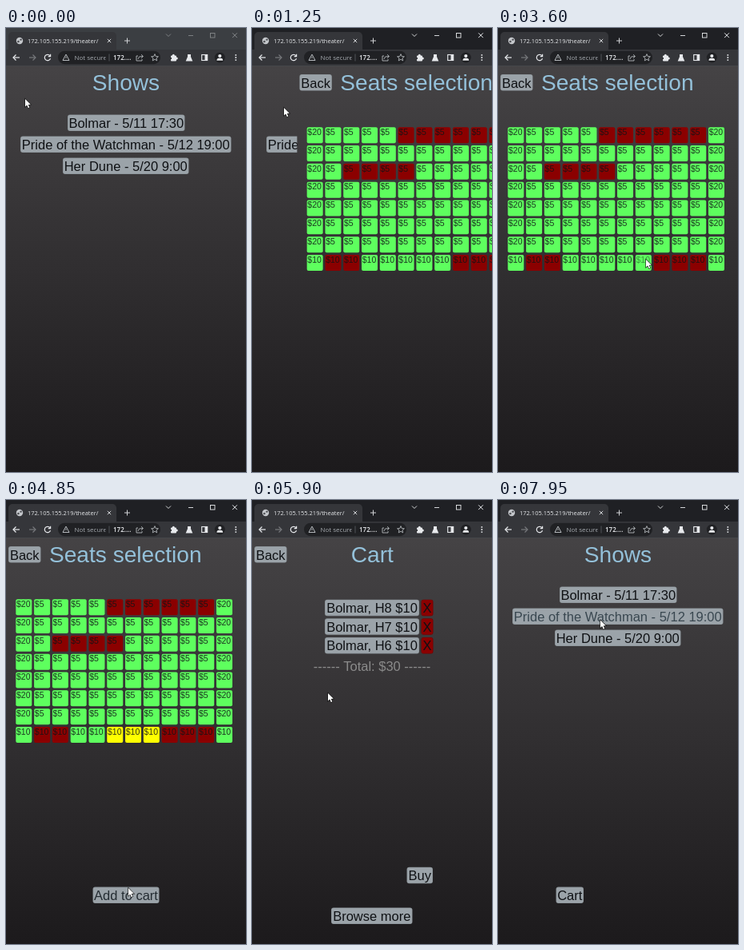
Write an HTML page with a canvas that moves like this. It is 300 by 556 pixels and loops after 8000 ms.

```html
<!DOCTYPE html>
<html lang="en">
<head>
<meta charset="utf-8">
<title>Theater</title>
<style>
html, body { margin: 0; width: 100%; height: 100%; overflow: hidden; background: #202124; }
canvas { display: block; width: 300px; height: 556px; }
</style>
</head>
<body>
<canvas id="stage"></canvas>
<script>
const W = 300, H = 556, LOOP = 8000, TOP = 48;
const PAGE_FONT = '"Liberation Sans", Arial, sans-serif';
const UI_FONT = '"Open Sans", "Noto Sans", sans-serif';
const canvas = document.getElementById('stage');
const ctx = canvas.getContext('2d');
const ratio = window.devicePixelRatio || 1;
canvas.width = W * ratio;
canvas.height = H * ratio;

const FOCUS = 800;
const SLIDE = 600;
const SEATS_IN = 945, CART_IN = 5180, CART_OUT = 7000;
const PICKS = { 7: 3720, 6: 3970, 5: 4200 };

// Pointer stops: time, x, y
const STOPS = [
  [0, 24, 89], [250, 24, 89], [700, 84, 117], [840, 84, 117], [1050, 37, 96],
  [1250, 40, 100], [2050, 141, 218], [2500, 160, 254], [3100, 182, 284],
  [3500, 185, 290], [3750, 185, 290], [3900, 162, 292], [4020, 162, 292],
  [4140, 139, 293], [4280, 139, 293], [4800, 153, 486], [5120, 153, 487],
  [5850, 95, 242], [6050, 95, 242], [6780, 139, 522], [7020, 139, 523],
  [7700, 127, 150], [8000, 128, 150.5]
];

const clamp = v => Math.max(0, Math.min(1, v));
const smooth = p => p * p * (3 - 2 * p);

// CSS "ease": cubic-bezier(.25, .1, .25, 1)
function ease(p) {
  p = clamp(p);
  let lo = 0, hi = 1;
  for (let i = 0; i < 20; i++) {
    const s = (lo + hi) / 2, r = 1 - s;
    const x = 0.75 * r * r * s + 0.75 * r * s * s + s * s * s;
    if (x < p) lo = s; else hi = s;
  }
  const r = 1 - lo;
  return 0.3 * r * r * lo + 3 * r * lo * lo + lo * lo * lo;
}

function pointer(t) {
  if (t <= 0) return { x: STOPS[0][1], y: STOPS[0][2] };
  const i = STOPS.findIndex(s => s[0] >= t);
  const a = STOPS[i - 1], b = STOPS[i];
  const k = smooth((t - a[0]) / (b[0] - a[0]));
  return { x: a[1] + (b[1] - a[1]) * k, y: a[2] + (b[2] - a[2]) * k };
}

// Share of the last 200 ms that the pointer spent inside the box
function hover(t, x, y, w, h) {
  let hits = 0;
  for (let i = 0; i < 8; i++) {
    const p = pointer(t - i * 25);
    if (p.x >= x && p.x <= x + w && p.y >= y && p.y <= y + h) hits++;
  }
  return hits / 8;
}

function text(str, x, y, size, color, { align = 'left', font = PAGE_FONT, weight = 400 } = {}) {
  ctx.font = `${weight} ${size}px ${font}`;
  ctx.textAlign = align;
  ctx.fillStyle = color;
  ctx.fillText(str, x, y);
}

function box(x, y, w, h, r, color) {
  ctx.fillStyle = color;
  ctx.beginPath();
  ctx.roundRect(x, y, w, h, r);
  ctx.fill();
}

function line(points, color, width = 1) {
  ctx.strokeStyle = color;
  ctx.lineWidth = width;
  ctx.beginPath();
  points.forEach(([x, y], i) => i ? ctx.lineTo(x, y) : ctx.moveTo(x, y));
  ctx.stroke();
}

function ring(x, y, r, color, width = 1, from = 0, to = Math.PI * 2) {
  ctx.strokeStyle = color;
  ctx.lineWidth = width;
  ctx.beginPath();
  ctx.arc(x, y, r, from, to);
  ctx.stroke();
}

function dot(x, y, r, color) {
  ctx.fillStyle = color;
  ctx.beginPath();
  ctx.arc(x, y, r, 0, Math.PI * 2);
  ctx.fill();
}

function cross(x, y, r, color) {
  line([[x - r, y - r], [x + r, y + r]], color);
  line([[x + r, y - r], [x - r, y + r]], color);
}

const PLAIN = { fill: '#9ba3a9', edge: '#868e93' };
const DANGER = { fill: '#8b0000', edge: '#750000' };

function button(label, x, y, w, t, live, style = PLAIN) {
  const h = 20.5;
  box(x, y, w, h, 3, style.edge);
  box(x + 0.6, y + 0.6, w - 1.2, h - 1.2, 2.5, style.fill);
  const k = live ? hover(t, x, y, w, h) : 0;
  const c = [15 + 42 * k, 17 + 54 * k, 20 + 60 * k].map(Math.round);
  text(label, x + w / 2, y + 16.5, 16.5, `rgb(${c})`, { align: 'center' });
}

function title(str, x, align = 'center') {
  text(str, x, 78, 28.1, '#94c1da', { align });
}

function backdrop() {
  const g = ctx.createLinearGradient(0, TOP, 0, H);
  g.addColorStop(0, '#454345');
  g.addColorStop(1, '#1c1a1c');
  ctx.fillStyle = g;
  ctx.fillRect(0, TOP, W, H - TOP);
}

function shows(t, live) {
  backdrop();
  title('Shows', 150);
  button('Bolmar - 5/11 17:30', 77, 108.5, 146.5, t, live);
  button('Pride of the Watchman - 5/12 19:00', 18, 135.5, 263.5, t, live);
  button('Her Dune - 5/20 9:00', 71, 162.5, 157.5, t, live);
  if (t > CART_IN) button('Cart', 72.5, 484.6, 34.5, t, live);
}

const TAKEN = { 0: [5, 10], 2: [2, 5] };
function isTaken(row, col) {
  if (row === 7) return col === 1 || col === 2 || (col > 7 && col < 11);
  const span = TAKEN[row];
  return !!span && col >= span[0] && col <= span[1];
}

function seats(t, live) {
  backdrop();
  button('Back', 3, 58, 40.5, t, live);
  title('Seats selection', 54, 'left');
  for (let row = 0; row < 8; row++) {
    for (let col = 0; col < 12; col++) {
      const x = 12.3 + col * 22.79, y = 124.2 + row * 22.83, s = 20;
      const taken = isTaken(row, col);
      const picked = row === 7 && t >= PICKS[col];
      box(x, y, s, s, 2, taken ? '#8b0000' : picked ? '#ffff00' : '#5eff5e');
      const price = row === 7 ? '$10' : col % 11 ? '$5' : '$20';
      const k = live && !taken ? hover(t, x, y, s, s) : 0;
      text(price, x + 0.7, y + 9.7, 10.5, `rgba(16,20,22,${0.85 - 0.4 * k})`);
    }
  }
  if (t >= PICKS[7]) button('Add to cart', 108.5, 484.6, 83, t, live);
}

function cart(t, live) {
  backdrop();
  button('Back', 3, 58, 40.5, t, live);
  title('Cart', 150.3);
  [8, 7, 6].forEach((n, i) => {
    const y = 124.7 + i * 23.6;
    button(`Bolmar, H${n} $10`, 91, y, 118, t, live);
    button('X', 211.5, y, 15, t, live, DANGER);
  });
  text('------ Total: $30 ------', 150, 213.5, 16.5, '#8b8b8b', { align: 'center' });
  button('Buy', 193.5, 459.7, 32.5, t, live);
  button('Browse more', 99, 510.5, 101.5, t, live);
}

function slideIn(page, dx, t, live) {
  if (dx >= W) return;
  ctx.save();
  ctx.translate(dx, 0);
  page(t, live);
  ctx.restore();
}

function pages(t) {
  const out = ease((t - CART_OUT) / SLIDE);
  const cartX = W * (1 - ease((t - CART_IN) / SLIDE) + out);
  const seatsX = W * (1 - ease((t - SEATS_IN) / SLIDE) + out);
  shows(t, t < SEATS_IN + 150 || t > CART_OUT + 300);
  slideIn(seats, seatsX, t, t > SEATS_IN + 400 && t < CART_IN + 150);
  if (t > CART_IN) slideIn(cart, cartX, t, t > CART_IN + 400 && t < CART_OUT + 200);
}

function tabStrip(t) {
  const focused = t >= FOCUS;
  ctx.fillStyle = focused ? '#1f2024' : '#3b3e42';
  ctx.fillRect(0, 0, W, 28);
  box(3, 5, 135, 26, [5, 5, 0, 0], '#35363a');

  dot(17, 16, 4.2, '#c4c7cb');
  dot(15.4, 17, 1.3, '#4b4d51');
  dot(18.6, 14.6, 1.2, '#4b4d51');
  text('172.105.155.219/theater/', 27, 18.6, 7.5, '#e4e6e9', { font: UI_FONT });
  cross(129, 16, 2.2, '#d0d2d5');
  line([[148, 16], [155, 16]], '#d0d2d5');
  line([[151.5, 12.5], [151.5, 19.5]], '#d0d2d5');

  const c = focused ? '#e8eaed' : '#85888b';
  line([[200, 7.5], [203, 10.5], [206, 7.5]], c, 0.9);
  line([[228, 9.5], [234, 9.5]], c, 0.9);
  ctx.lineWidth = 0.9;
  ctx.strokeRect(255.5, 6.5, 5.5, 5.5);
  cross(286, 9.2, 2.9, c);
}

function arrow(x, y, dir, color) {
  line([[x - 4, y], [x + 4, y]], color, 1.2);
  line([[x + dir * 0.5, y - 3.5], [x + dir * 4, y], [x + dir * 0.5, y + 3.5]], color, 1.2);
}

function starPath(x, y, r) {
  const points = [];
  for (let i = 0; i <= 10; i++) {
    const a = -Math.PI / 2 + i * Math.PI / 5, d = i % 2 ? r * 0.45 : r;
    points.push([x + Math.cos(a) * d, y + Math.sin(a) * d]);
  }
  return points;
}

function toolbar() {
  const y = 37, bright = '#e8eaed', soft = '#b4b8bc';
  ctx.fillStyle = '#35363a';
  ctx.fillRect(0, 27, W, 20.5);
  ctx.fillStyle = '#4a4b4e';
  ctx.fillRect(0, 47.3, W, 0.7);

  arrow(13, y, -1, bright);
  arrow(33, y, 1, '#77797d');
  ring(52, y, 3.7, bright, 1.2, 0.3, 5.6);
  line([[55.6, 32.8], [55.6, 35.7], [52.7, 35.7]], bright, 1.2);

  box(65, 28.7, 128, 16.5, 8.2, '#202124');
  line([[75, 33], [79, 40.5], [71, 40.5], [75, 33]], soft, 1);
  line([[75, 35.7], [75, 38.2]], soft, 0.9);
  ctx.save();
  ctx.beginPath();
  ctx.rect(84, 28, 40.5, 18);
  ctx.clip();
  text('Not secure', 85.5, 39.8, 8, '#a6abb0', { font: UI_FONT });
  ctx.restore();
  line([[129, 32.5], [129, 41.5]], '#5f6368', 0.8);
  text('172....', 134, 39.8, 8, bright, { font: UI_FONT, weight: 600 });

  line([[165, 35], [163, 35], [163, 41], [170, 41], [170, 39]], soft, 0.9);
  line([[165, 39], [166.5, 36], [171, 35.5]], soft, 0.9);
  line([[169, 33.2], [171.5, 35.5], [169, 37.8]], soft, 0.9);
  line(starPath(186, y + 0.2, 4.6), soft, 0.9);

  box(206, 34.5, 7, 7, 1, bright);
  dot(209.3, 34.2, 1.5, bright);
  dot(213.3, 38, 1.5, bright);
  dot(206, 38, 1.2, '#35363a');

  ctx.fillStyle = bright;
  ctx.beginPath();
  [[227, 33], [231, 33], [231, 36], [233.3, 41.5], [224.7, 41.5], [227, 36]]
    .forEach(([px, py]) => ctx.lineTo(px, py));
  ctx.fill();

  ctx.strokeStyle = bright;
  ctx.lineWidth = 1.1;
  ctx.strokeRect(244.7, 33.5, 7, 7);
  ctx.fillStyle = bright;
  ctx.fillRect(248.5, 33.5, 3.2, 7);

  dot(267.3, y, 6.5, '#202124');
  dot(267.3, 35, 2.1, bright);
  box(263.4, 37.8, 7.8, 3, [3, 3, 0, 0], bright);
  for (let i = -1; i <= 1; i++) dot(287.3, y + i * 3.1, 0.95, bright);
}

function drawPointer(t) {
  const p = pointer(t);
  ctx.save();
  ctx.translate(p.x, p.y);
  ctx.beginPath();
  [[0, 0], [0, 9.6], [2.2, 7.6], [3.8, 11.2], [5.3, 10.5], [3.8, 7], [6.8, 6.8]]
    .forEach(([x, y]) => ctx.lineTo(x, y));
  ctx.closePath();
  ctx.lineWidth = 1.2;
  ctx.strokeStyle = '#111';
  ctx.stroke();
  ctx.fillStyle = '#fff';
  ctx.fill();
  ctx.restore();
}

function draw(now) {
  const t = now % LOOP;
  ctx.setTransform(ratio, 0, 0, ratio, 0, 0);
  pages(t);
  tabStrip(t);
  toolbar();
  drawPointer(t);
}

const start = performance.now();
function tick() {
  draw(performance.now() - start);
  requestAnimationFrame(tick);
}
tick();
</script>
</body>
</html>
```
